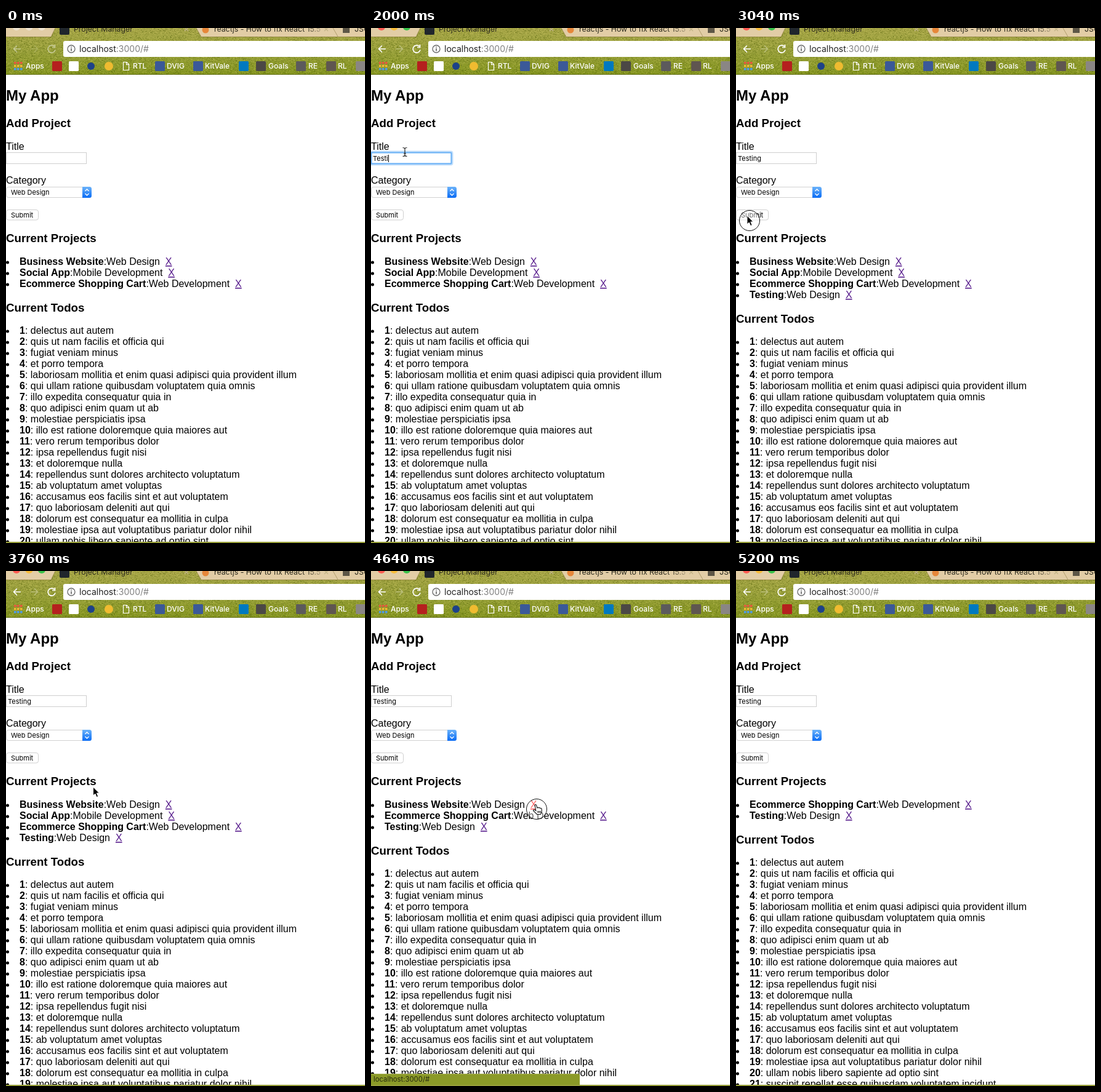
An HTML page with a canvas for the animation above (5.76 s loop, 583 by 837 pixels).

```html
<!DOCTYPE html>
<html lang="en">
<head>
<meta charset="utf-8">
<title>Project Manager</title>
<style>
  html, body { margin: 0; width: 100%; height: 100%; overflow: hidden; background: #fff; }
  canvas, svg { position: absolute; left: 0; top: 0; display: block; }
  text { font: 16px "Liberation Sans", Arial, sans-serif; fill: #000; }
  .h2 { font-size: 24px; font-weight: 700; }
  .h3 { font-size: 18.72px; font-weight: 700; }
  .b { font-weight: 700; }
  .x { fill: #551a8b; text-decoration: underline; }
  .x.hot { fill: #f00; }
  .ui { font: 11px Inter, Roboto, sans-serif; }
  .tab { font: 12.3px Inter, Roboto, sans-serif; fill: #2c2a1c; }
  .mark { font: 500 12px Inter, Roboto, sans-serif; fill: #fff; }
  .url { font: 14px Inter, Roboto, sans-serif; fill: #222; }
</style>
</head>
<body>
<canvas id="grain" width="583" height="76"></canvas>
<svg width="583" height="837" viewBox="0 0 583 837">
  <defs>
    <linearGradient id="fade">
      <stop offset=".86" stop-color="#2c2a1c"/>
      <stop offset="1" stop-color="#2c2a1c" stop-opacity=".25"/>
    </linearGradient>
    <linearGradient id="blue" x2="0" y2="1">
      <stop stop-color="#6cb3fa"/><stop offset="1" stop-color="#0a6cf5"/>
    </linearGradient>
  </defs>

  <!-- tab strip -->
  <path d="M0 0H80L73 14H0Z M309 0H583V14H317Z" fill="#e2cda6"/>
  <path d="M0 14.5H73L80 0M309 0L317 14.5H583M531 0L539 14" fill="none" stroke="#8c7c45" stroke-opacity=".6"/>
  <g id="lights"></g>
  <rect x="87" y="-5" width="16" height="16" rx="2" fill="#20262c"/>
  <text class="tab" x="110" y="6">Project Manager</text>
  <circle cx="324" cy="3" r="5.5" fill="#e6873a"/>
  <text class="tab" x="338" y="6" style="fill:url(#fade)">reactjs - How to fix React 15.5</text>
  <path d="M290 -1l6 6m0 -6l-6 6M517 -1l6 6m0 -6l-6 6" stroke="#c2b487" stroke-width="1.3"/>
  <rect x="547" y="-3" width="11" height="11" fill="#5d5646"/>
  <text class="tab" x="566" y="6">JSON</text>

  <!-- navigation -->
  <g id="nav" fill="none" stroke="#fff" stroke-width="1.7">
    <path d="M24 34H12.5M18 28.5L12.5 34L18 39.5"/>
    <path d="M40 34H51.500M46 28.500L51.500 34L46 39.500" opacity=".3"/>
    <path id="reload" d="M78.500 30A6 6 0 1 0 80 35.500M79.500 27V31.500H75"/>
  </g>
  <path d="M583 21H96a3 3 0 0 0-3 3V44a3 3 0 0 0 3 3H583Z" fill="#fff"/>
  <circle cx="106" cy="34" r="6" fill="none" stroke="#666" stroke-width="1.3"/>
  <path d="M106 33V37.500M106 30.300V31.800" stroke="#555" stroke-width="1.500"/>
  <text class="url" x="119" y="39">localhost<tspan fill="#808080">:3000/#</tspan></text>
  <g id="marks"></g>

  <!-- page -->
  <text class="h2" x="0" y="118">My App</text>
  <text class="h3" x="0" y="161">Add Project</text>
  <text x="0" y="198">Title</text>
  <rect x=".5" y="202.500" width="130" height="18" fill="#fff" stroke="#cfcfcf"/>
  <g id="focus" fill="none" stroke="#6cb2f6">
    <rect x="-.5" y="201.500" width="132" height="20" rx="2" stroke-width="4" stroke-opacity=".4"/>
    <rect x=".5" y="202.500" width="130" height="18" rx="1" stroke-width="2"/>
  </g>
  <text id="typed" class="ui" x="3" y="216"></text>
  <rect id="caret" y="206" width="1" height="12"/>
  <text x="0" y="253">Category</text>
  <rect x=".5" y="258.500" width="138" height="17" rx="3.500" fill="#fff" stroke="#d2d2d2"/>
  <path d="M124 258H135.500a3.500 3.500 0 0 1 3.500 3.500V272.500a3.500 3.500 0 0 1-3.500 3.500H124Z" fill="url(#blue)"/>
  <path d="M128.500 265L131.500 262L134.500 265M128.500 269L131.500 272L134.500 269" fill="none" stroke="#fff" stroke-width="1.400"/>
  <text class="ui" x="8" y="271">Web Design</text>
  <rect x=".5" y="295.500" width="52" height="16.500" rx="3.500" fill="#fff" stroke="#d0d0d0"/>
  <text class="ui" x="8" y="308">Submit</text>
  <text class="h3" x="0" y="348">Current Projects</text>
  <g id="projects"></g>
  <g id="todos">
    <text class="h3" x="0" y="461">Current Todos</text>
  </g>

  <!-- bottom edge and link hint -->
  <rect y="835" width="583" height="2" fill="#98a03a"/>
  <g id="hint">
    <path d="M0 817H336a3 3 0 0 1 3 3V835H0Z" fill="#8b9a28"/>
    <path d="M0 817.500H336" stroke="#a5ad55"/>
    <text class="ui" x="4" y="830" style="font-size:11.300px;fill:#26290f">localhost:3000/#</text>
  </g>

  <circle id="ring" r="16.500" fill="#fff" fill-opacity=".4" stroke="#111"/>
  <g id="pointer">
    <path id="arrow" d="M0 0V14L3.300 11L5.700 16.500L8.200 15.400L5.800 10H10Z" fill="#000" stroke="#fff"/>
    <path id="beam" d="M-3.500 -6.500Q0 -6.500 0 -4.500Q0 -6.500 3.500 -6.500M0 -5V6M-3.500 7.500Q0 7.500 0 5.500Q0 7.500 3.500 7.500M-2 3H2" fill="none" stroke="#222" stroke-width="1.200"/>
    <path id="hand" d="M1 1.500Q2 -.5 3.500 1.500L5 6Q6.500 4.500 7.500 6Q9 5 10 6.700Q12 6 12.200 8.500V12L10.500 16.500H4.500L-1.500 10.500Q-1.500 8.500 .5 9L2.800 10.500Z M6 11V14M8 11V14M10 11V14" fill="#fff" stroke="#111" stroke-width="1.100"/>
  </g>
</svg>

<script>
const LOOP = 5760, STEP = 80;
const $ = id => document.getElementById(id);

function add(parent, tag, attrs, text) {
  const el = document.createElementNS("http://www.w3.org/2000/svg", tag);
  for (const k in attrs) el.setAttribute(k, attrs[k]);
  if (text) el.textContent = text;
  return parent.appendChild(el);
}
const show = (id, on) => $(id).setAttribute("visibility", on ? "visible" : "hidden");

// textured toolbar
function paintGrain() {
  const c = $("grain").getContext("2d");
  const g = c.createLinearGradient(0, 0, 0, 76);
  g.addColorStop(0, "#a8a648");
  g.addColorStop(.5, "#98a03a");
  g.addColorStop(1, "#84951f");
  c.fillStyle = g;
  c.fillRect(0, 0, 583, 76);
  let seed = 7;
  const rnd = () => (seed = seed * 16807 % 2147483647) / 2147483647;
  for (let i = 0; i < 15000; i++) {
    c.fillStyle = rnd() < .55 ? "rgba(75,88,5,.26)" : "rgba(212,205,110,.26)";
    c.fillRect(rnd() * 583 | 0, rnd() * 76 | 0, 1 + rnd() * 2 | 0, 1);
  }
  c.fillStyle = "rgba(80,90,15,.6)";
  c.fillRect(0, 75, 583, 1);
}

function paintMarks() {
  const m = $("marks");
  ["#e8573f", "#f2b632", "#4f9be8"].forEach((fill, r) => {
    for (let k = 0; k < 3; k++)
      add(m, "rect", { x: 13 + k * 5, y: 55 + r * 5, width: 3.5, height: 3.5, fill });
  });
  const squares = [[75, "#b5201e"], [102, "#fff"], [242, "#3b5998"], [304, "#3b5998"], [378, "#0079bf"],
    [406, "#4b4845"], [471, "#5c5a5c"], [520, "#5f5650"], [568, "#8a8684"]];
  for (const [x, fill] of squares) add(m, "rect", { x, y: 54, width: 16, height: 16, rx: 1.5, fill });
  add(m, "circle", { cx: 138, cy: 62, r: 6, fill: "#1d4288" });
  add(m, "circle", { cx: 167, cy: 62, r: 7, fill: "#f0bb30" });
  add(m, "path", { d: "M190.5 55.5H196L199.500 59V68.500H190.500ZM195.500 55.500V59.500H199.500",
    fill: "none", stroke: "#fff", "stroke-width": 1.2 });
  const labels = [[32, "Apps"], [206, "RTL"], [261, "DVIG"], [323, "KitVale"], [426, "Goals"], [491, "RE"], [539, "RL"]];
  for (const [x, s] of labels) add(m, "text", { class: "mark", x, y: 66 }, s);
}

function row(parent, y, name, rest) {
  add(parent, "circle", { cx: 2.5, cy: y - 4, r: 2.5 });
  const t = add(parent, "text", { x: 22, y });
  add(t, "tspan", { class: "b" }, name);
  add(t, "tspan", {}, rest);
  return t;
}

const TODOS = `delectus aut autem
quis ut nam facilis et officia qui
fugiat veniam minus
et porro tempora
laboriosam mollitia et enim quasi adipisci quia provident illum
qui ullam ratione quibusdam voluptatem quia omnis
illo expedita consequatur quia in
quo adipisci enim quam ut ab
molestiae perspiciatis ipsa
illo est ratione doloremque quia maiores aut
vero rerum temporibus dolor
ipsa repellendus fugit nisi
et doloremque nulla
repellendus sunt dolores architecto voluptatum
ab voluptatum amet voluptas
accusamus eos facilis sint et aut voluptatem
quo laboriosam deleniti aut qui
dolorum est consequatur ea mollitia in culpa
molestiae ipsa aut voluptatibus pariatur dolor nihil
ullam nobis libero sapiente ad optio sint
suscipit repellat esse quibusdam voluptatem incidunt`.split("\n");

const PROJECTS = {
  B: ["Business Website", "Web Design"],
  S: ["Social App", "Mobile Development"],
  E: ["Ecommerce Shopping Cart", "Web Development"],
  T: ["Testing", "Web Design"]
};

// [from ms, value]
const LISTS = [[0, "BSE"], [3040, "BSET"], [4320, "BET"], [4800, "ET"]];
const PRESSED = [[0, ""], [4160, "S"], [4320, ""], [4560, "B"], [4800, ""]];
const LETTERS = [[0, 0], [1600, 1], [1680, 2], [1840, 3], [1920, 4], [2000, 5], [2160, 6], [2240, 7]];
const SHAPES = [[0, ""], [560, "arrow"], [1120, "beam"], [2480, "arrow"], [4080, "hand"],
  [4960, "arrow"], [5200, ""]];
const CLICKS = [[1200, 1360], [2880, 3120], [4160, 4320], [4560, 4800]];
// [ms, x, y] of the pointer
const PATH = [[560, 92, 282], [800, 78, 258], [960, 62, 232], [1200, 55, 201], [2320, 55, 201],
  [2880, 18, 305], [3440, 18, 305], [4080, 265, 397], [4320, 265, 397], [4560, 265, 379],
  [4800, 265, 379], [5200, 330, -20]];

const at = (table, t) => table.reduce((v, [from, val]) => t >= from ? val : v, table[0][1]);
const within = (t, a, b) => t >= a && t < b;

function pointerAt(t) {
  const i = PATH.findIndex(p => p[0] > t);
  if (i === 0) return PATH[0].slice(1);
  if (i < 0) return PATH[PATH.length - 1].slice(1);
  const [t0, x0, y0] = PATH[i - 1], [t1, x1, y1] = PATH[i];
  const k = (t - t0) / (t1 - t0), e = k * k * (3 - 2 * k);
  return [x0 + (x1 - x0) * e, y0 + (y1 - y0) * e];
}

function drawLists(keys, hot) {
  const g = $("projects");
  g.replaceChildren();
  [...keys].forEach((k, i) => {
    const [name, kind] = PROJECTS[k];
    const t = row(g, 385 + 18 * i, name, ":" + kind + "\u00a0\u00a0");
    add(t, "tspan", { class: k === hot ? "x hot" : "x" }, "X");
  });
  $("todos").setAttribute("transform", `translate(0 ${18 * (keys.length - 3)})`);
}

function drawWindow(active) {
  const g = $("lights");
  g.replaceChildren();
  const fills = active ? ["#fc5b52", "#f8bd3a", "#39c24a"] : ["#eee3d0", "#eee3d0", "#eee3d0"];
  fills.forEach((fill, i) => add(g, "circle", { cx: 17 + i * 20.5, cy: -2, r: 6, fill }));
  $("nav").setAttribute("opacity", active ? 1 : .45);
}

let last = -1;
function render(ms) {
  const t = Math.floor(ms % LOOP / STEP) * STEP;
  if (t === last) return;
  last = t;
  drawWindow(t >= 560);
  drawLists(at(LISTS, t), at(PRESSED, t));

  const focused = within(t, 1200, 2880);
  show("focus", focused);
  show("caret", focused);
  $("typed").textContent = "Testing".slice(0, at(LETTERS, t));
  $("caret").setAttribute("x", 3 + Math.round($("typed").getComputedTextLength()));
  show("hint", within(t, 4160, 4960));

  const shape = at(SHAPES, t), [x, y] = pointerAt(t);
  for (const s of ["arrow", "beam", "hand"]) show(s, s === shape);
  $("pointer").setAttribute("transform", `translate(${x} ${y})`);
  const off = shape === "beam" ? [0, 0] : [4, 8];
  $("ring").setAttribute("cx", x + off[0]);
  $("ring").setAttribute("cy", y + off[1]);
  show("ring", CLICKS.some(([a, b]) => within(t, a, b)));
}

paintGrain();
paintMarks();
TODOS.forEach((s, i) => row($("todos"), 497 + 18 * i, String(i + 1), ": " + s));

const start = performance.now();
function tick() {
  render(performance.now() - start);
  requestAnimationFrame(tick);
}
tick();
</script>
</body>
</html>
```
